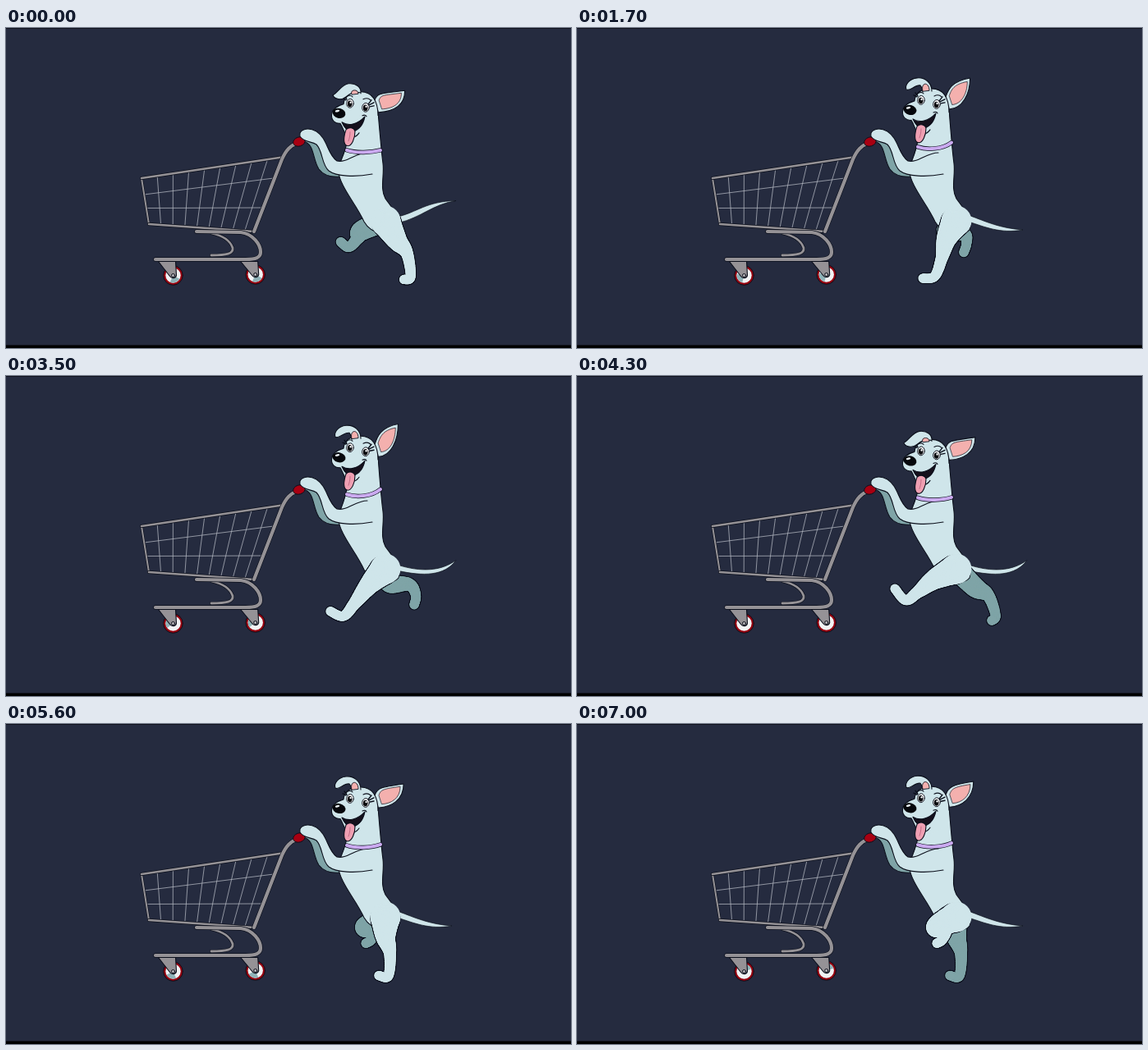
An HTML page with a canvas that plays this animation: 688 by 390 pixels, repeating every 7.1 s.

```html
<!DOCTYPE html>
<html lang="en">
<head>
<meta charset="utf-8">
<title>Dog pushing a cart</title>
<style>
  html, body { margin: 0; width: 100%; height: 100%; overflow: hidden; background: #252b3f; }
  canvas { display: block; width: 688px; height: 390px; }
</style>
</head>
<body>
<canvas id="stage" width="688" height="390"></canvas>
<script>
const ctx = document.getElementById('stage').getContext('2d');
const { cos, sin, min, max, floor, PI } = Math;
const LOOP = 7100, STEP = 100, STRIDE = 950, DRAWINGS = 12, GROUND = 306.5;
const INK = '#0b0f1b', FUR = '#cfe5ea', SHADE = '#7fa4a7', PINK = '#f4b0ae',
      STEEL = '#959296', RED = '#a80012';
const LEG_RADII = [19, 12.5, 8, 6.5, 6.2];

const EARS = {
  folded: 'M432 79C433 71 426 66 417 67C409 68 404 78 398 81C400 86 408 88 414 83C420 78 424 77 432 78',
  raised: 'M432 80C432 70 424 63 414 64C404 65 399 73 401 78C406 81 411 72 418 73C420 75 420 78 421 81'
};
const TAILS = {
  up: 'M477 230C500 225 512 211 548 210.5C520 214.5 506 231 478 237.5Z',
  mid: 'M478 230.5C505 239 530 238 548 224.5C534 244 508 244 478 237.5Z',
  down: 'M478 228.5C498 236 515 244 543 246C515 251 496 242 478 236.5Z'
};

function shape(d, fill, stroke = INK, width = 1.1) {
  const path = new Path2D(d);
  if (fill) { ctx.fillStyle = fill; ctx.fill(path); }
  if (stroke) { ctx.strokeStyle = stroke; ctx.lineWidth = width; ctx.stroke(path); }
}

function oval(x, y, rx, ry, fill, angle = 0, stroke) {
  ctx.beginPath();
  ctx.ellipse(x, y, rx, ry, angle, 0, PI * 2);
  ctx.fillStyle = fill;
  ctx.fill();
  if (stroke) { ctx.strokeStyle = stroke; ctx.lineWidth = 1; ctx.stroke(); }
}

function tube(d, width) {
  shape(d, null, INK, width + 1.2);
  shape(d, null, STEEL, width);
}

function spline(a, b, c, d, u) {
  return .5 * (2 * b + (c - a) * u + (2 * a - 5 * b + 4 * c - d) * u * u
    + (3 * b - a - 3 * c + d) * u * u * u);
}

// Hip, knee, shin, heel and toe; every joint swings once per stride with its own lag.
function legJoints(a) {
  const swing = (middle, reach, lag) => middle + reach * cos(a - lag);
  return [
    [462, 235],
    [swing(455, 25, 0) + 6 * cos(2 * a - .6), swing(253, 6, -.64)],
    [swing(458, 45, .31), swing(265.5, 14.5, -1.42)],
    [swing(455, 58, .34), swing(282.5, 22, -1.14) - 3 * sin(2 * a)],
    [swing(446, 64, .4), min(GROUND, swing(284, 25, -.68) - 7 * cos(2 * a - .7))]
  ];
}

function drawLeg(angle, color, hipScale) {
  const joints = legJoints(angle).map(([x, y], i) => [x, y, LEG_RADII[i] * (i ? 1 : hipScale)]);
  const joint = i => joints[max(0, min(joints.length - 1, i))];
  const dots = [];
  for (let n = 0; n <= 80; n++) {
    const i = min(3, floor(n / 20)), u = n / 20 - i;
    const [x, y] = [0, 1].map(axis =>
      spline(...[-1, 0, 1, 2].map(k => joint(i + k)[axis]), u));
    dots.push([x, y, joint(i)[2] + (joint(i + 1)[2] - joint(i)[2]) * u]);
  }
  dots.slice(3).forEach(([x, y, r]) => oval(x, y, r + .5, r + .5, INK));
  dots.forEach(([x, y, r]) => oval(x, y, r - .6, r - .6, color));
}

function drawWheel(x, y, angle) {
  oval(x, y, 11.8, 11.8, '#96000f', 0, INK);
  oval(x, y, 9.2, 9.2, '#f1f3f4');
  ctx.fillStyle = '#8fb3b8';
  ctx.beginPath();
  ctx.moveTo(x, y);
  ctx.arc(x, y, 9, angle, angle + 1.5);
  ctx.fill();
}

function drawCart(t) {
  ctx.strokeStyle = '#b4b8c2';
  ctx.lineWidth = .75;
  ctx.beginPath();
  for (let i = 1; i <= 8; i++) {
    ctx.moveTo(165 + 19.2 * i, 183 - 2.9 * i);
    ctx.lineTo(174 + 14.6 * i, 239 + i);
  }
  ctx.moveTo(168, 203); ctx.lineTo(326, 183);
  ctx.moveTo(171, 219.5); ctx.lineTo(313, 219);
  ctx.stroke();

  tube('M165 183L174 239', 2);
  tube('M165 183L336 157.5', 2.6);
  tube('M174 239L302 248', 2.6);
  tube('M250 277C269 277 277 275 276 268C273 259 264 253 250 250', 2.8);
  tube('M232 248L286 249C301 251 310 264 310 273C310 280 304 282 292 282L182 282', 4.2);
  tube('M302 248L336 160C341 149 346 143 356 140', 4.2);

  const turn = -t / STRIDE * PI * 2 + .5;
  for (const [x, y] of [[203.5, 301.5], [303.7, 300.5]]) {
    drawWheel(x, y, turn);
    shape(`M${x - 18} 284.5H${x + 3}L${x + 4} ${y}C${x + 3} ${y + 4} ${x - 2} ${y + 4} ${x - 4} ${y + 1}Z`, STEEL);
    oval(x, y, 2, 2, '#b9b7bb', 0, INK);
  }
}

function drawBody(dy) {
  shape(`M416 ${134 + dy}C414 150 408 160 404 172C407 195 425 212 436 236C445 252 470 256 478 246
    C482 232 472 222 462 208C455 195 461 180 459 165C457 150 455 125 453 ${102 + dy}`, FUR);
}

function drawUprightEar(dy, lift) {
  const x = 486 - 9 * lift, y = 77 - 19.5 * lift;
  const d = `M449 ${87 + dy}C452 ${78 + dy} 456 ${y + 4} ${x} ${y}
    C${x} ${y + 20} 469 ${101 + dy} 454 ${102 + dy}`;
  shape(d, FUR);
  const cx = (453 + x) / 2, cy = (94 + dy + y) / 2 + 2;
  ctx.save();
  ctx.translate(cx, cy);
  ctx.scale(.74, .74);
  ctx.translate(-cx, -cy);
  shape(d + 'Z', PINK, INK, .9);
  ctx.restore();
}

function drawHead(dy, lift, ear) {
  drawUprightEar(dy, lift);
  ctx.save();
  ctx.translate(0, dy);
  shape(`M453 106C453 88 446 77 432 77C420 77 412 82 411 92C404 94 397 98 396.5 105
    C396 112 401 116 407 115.5C411 121 412 130 418 134`, FUR);
  shape('M417 134C424 138 453 134 453 106Z', FUR, null);
  shape('M409 114C417 119 428 117 437 107C435 117 430 123 423 125C416 126 412 121 409 114Z', '#15101c');
  shape('M434 106C436 105 438 105 439 107M416 131C419 134 426 133 430 127', null);
  shape('M414 123C418 119 424 121 425 125C425 134 421 143 416 143C410 142 411 132 414 123Z', '#ef9fb2');
  shape('M419 126C419 131 418 134 417 137', null, '#b8607a', .8);

  oval(405.5, 103, 8, 6, '#05070c', .25);
  oval(403.5, 100.3, 2.8, 1.3, '#e8eef2', -.2);
  for (const [x, y] of [[419, 91], [438, 96]]) {
    oval(x, y, 4.3, 5.4, '#fff', .1, INK);
    oval(x - .3, y + .6, 2.8, 3.8, '#05070c');
    oval(x + .6, y - 1, 1.1, 1.3, '#fff');
  }
  shape('M414 87L410 85M415 86L412 82M441 92L445 87M442 93L448 90M443 95L448 94', null, INK, 1.4);
  shape('M414 84C417 81 420 81 422 83M435 86C439 84 442 85 444 87', null);

  shape(EARS[ear], FUR);
  const tipTop = ear === 'raised' ? 69 : 74;
  shape(`M421 80C418 ${tipTop} 429 ${tipTop - 1} 429 79Z`, PINK, INK, .9);
  ctx.restore();
}

function drawCollar(dy) {
  const right = 147 + 2.4 * dy, left = 148 + dy;
  const d = `M415 ${left}C426 ${left + 4} 445 ${left + 3} 456 ${right}`;
  shape(d, null, INK, 5.4);
  shape(d, null, '#cbaaf0', 4);
}

function drawArm() {
  shape(`M440 152C425 152 415 165 403 162C391 154 392 135 378 126C367 120 356 124 358 132
    C362 139 372 138 378 142C386 150 384 166 393 174C402 181 425 182 446 178`, FUR);
}

function draw(t) {
  ctx.fillStyle = '#252b3f';
  ctx.fillRect(0, 0, 688, 390);
  ctx.fillStyle = '#10131f';
  ctx.fillRect(0, 0, 688, 1);
  ctx.fillStyle = '#000';
  ctx.fillRect(0, 386.5, 688, 3.5);

  const step = t / STRIDE * 2 % 1;
  const stride = floor(t / STRIDE * DRAWINGS - .1) / DRAWINGS * 2 * PI;
  const lift = (1 - cos(2 * PI * (step + .06))) / 2;
  const dy = 1 - 5 * lift;
  const ear = step < .2 || step > .88 ? 'folded' : 'raised';
  const tail = step < .026 || step > .86 ? 'up' : step < .552 ? 'mid' : 'down';

  drawCart(t);
  shape(TAILS[tail], FUR, INK, .7);
  drawLeg(stride + PI, SHADE, .75);
  shape('M362 138C376 141 373 160 381 172C387 180 398 182 408 181L400 165C385 150 385 140 370 136Z', SHADE);
  drawBody(dy);
  drawLeg(stride, FUR, 1);
  oval(357, 138.5, 7.5, 5.5, RED, -.3, INK);
  drawArm();
  drawCollar(dy);
  drawHead(dy, lift, ear);
}

ctx.lineCap = ctx.lineJoin = 'round';

function tick() {
  const t = performance.now() % LOOP;
  draw(floor(t / STEP) * STEP);
  requestAnimationFrame(tick);
}
tick();
</script>
</body>
</html>
```
